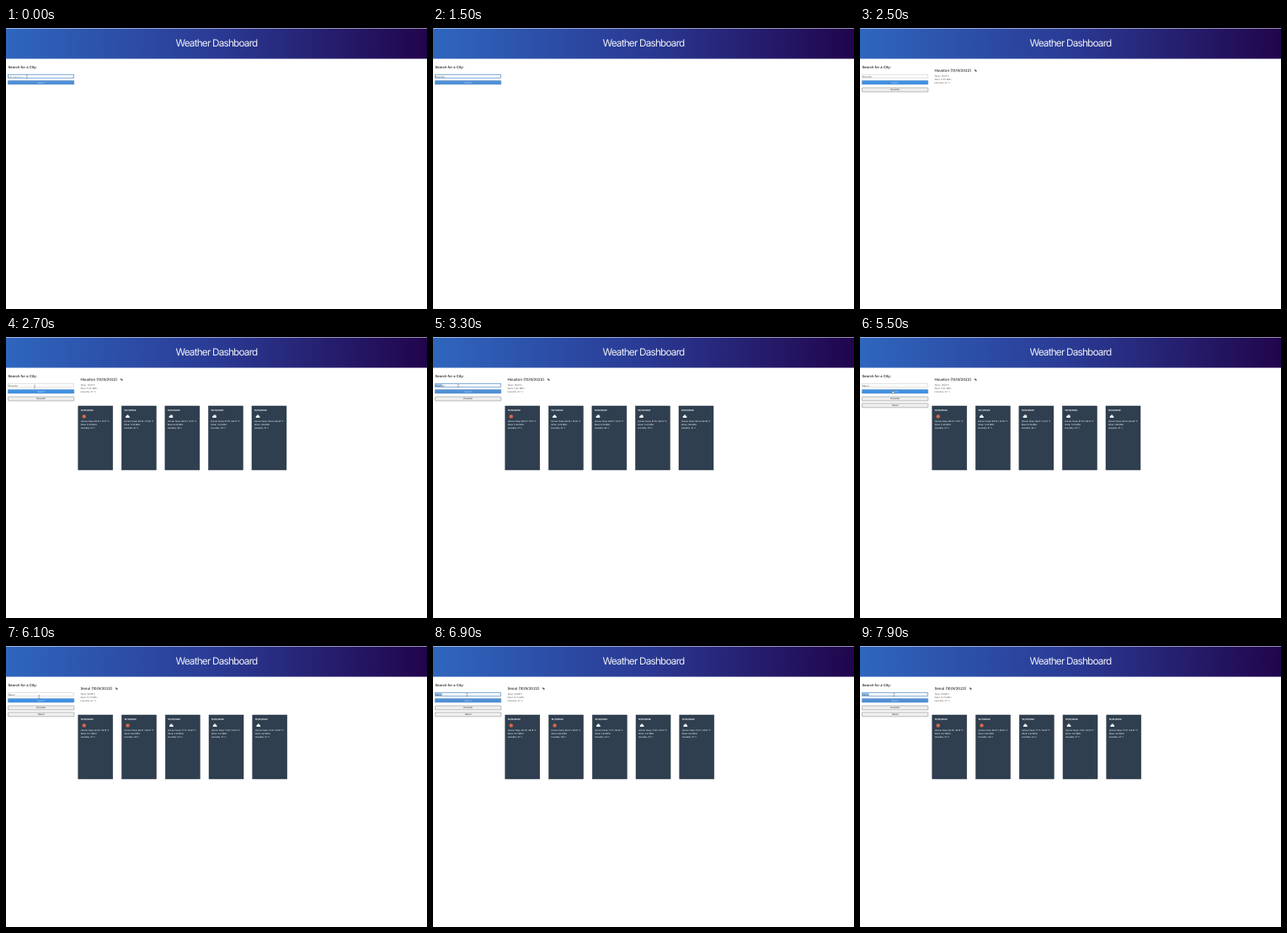
Animation, 500 px wide and 334 px high, one loop 8 s. Source, as an HTML page:

```html
<!DOCTYPE html>
<html lang="en">
<head>
<meta charset="utf-8">
<title>Weather Dashboard</title>
<style>
  html, body { margin: 0; width: 100%; height: 100%; overflow: hidden; background: #fff; }
  svg { display: block; width: 500px; height: 334px; }
  text { font-family: Inter, Roboto, "Liberation Sans", sans-serif; text-rendering: geometricPrecision; white-space: pre; }
  .title { font-size: 11.8px; font-weight: 400; letter-spacing: -.82px; fill: #eceef6; }
  .label { font-size: 4.15px; font-weight: 600; fill: #2a2a2a; }
  .field { font-size: 2.75px; fill: #444; }
  .hint { font-size: 2.6px; fill: #858b94; }
  .btn { font-size: 2.7px; fill: #c5d9f0; }
  .past { font-size: 2.75px; fill: #222; }
  .city { font-size: 4.4px; font-weight: 500; fill: #222; }
  .now { font-size: 2.55px; fill: #555; }
  .date { font-size: 2.7px; font-weight: 700; fill: #fff; }
  .info { font-size: 2.4px; font-weight: 500; fill: #f2f5f7; }
</style>
</head>
<body>
<svg id="stage" viewBox="0 0 500 334" xmlns="http://www.w3.org/2000/svg">
  <defs>
    <linearGradient id="sky">
      <stop offset="0" stop-color="#2f66be"/>
      <stop offset=".5" stop-color="#2a3a94"/>
      <stop offset="1" stop-color="#21054c"/>
    </linearGradient>
  </defs>
  <rect width="500" height="334" fill="#fff"/>
  <rect y=".55" width="500" height="36" fill="url(#sky)"/>
  <text class="title" x="250" y="22" text-anchor="middle">Weather Dashboard</text>
  <text class="label" x="2.4" y="48.3">Search for a City:</text>
</svg>
<script>
const LOOP = 8000;
const stage = document.getElementById('stage');

function add(parent, tag, attrs, text) {
  const el = document.createElementNS('http://www.w3.org/2000/svg', tag);
  for (const k in attrs) el.setAttribute(k, attrs[k]);
  if (text) el.textContent = text;
  parent.appendChild(el);
  return el;
}
const group = (parent, x = 0, y = 0) => add(parent, 'g', { transform: `translate(${x} ${y})` });
const label = (parent, cls, x, y, text, anchor = 'start') =>
  add(parent, 'text', { class: cls, x, y, 'text-anchor': anchor }, text);
const show = (el, on) => { el.style.display = on ? '' : 'none'; };

// Search form
const box = add(stage, 'rect', { x: 2.5, y: 55.5, width: 78, height: 4, fill: '#fff' });
const mark = add(stage, 'rect', { x: 3, y: 56, width: 7.6, height: 3, fill: '#9cc3f3' });
const typed = label(stage, 'field', 3, 58.5);
const button = add(stage, 'rect', { x: 2.4, y: 62.4, width: 78.4, height: 4.7, rx: .5, stroke: '#5a83b5', 'stroke-width': .4 });
label(stage, 'btn', 41.7, 65.8, 'Search', 'middle');

function pastButton(y, name) {
  const g = group(stage, 0, y);
  add(g, 'rect', { x: 2.6, y: .4, width: 78.2, height: 4.9, rx: .5, fill: '#efefef', stroke: '#858585', 'stroke-width': .55 });
  label(g, 'past', 41.7, 3.9, name, 'middle');
  return g;
}
const past = [pastButton(70.6, 'Houston'), pastButton(78.5, 'Seoul')];

// Weather icons
const blob = (g, cx, cy, r, fill) => add(g, 'circle', { cx, cy, r, fill });
function cloud(g, fill) {
  blob(g, -1.2, .4, 1.1, fill);
  blob(g, .1, -.4, 1.4, fill);
  blob(g, 1.4, .5, 1, fill);
  add(g, 'rect', { x: -2.3, y: .2, width: 4.7, height: 1.3, rx: .6, fill });
}
const icons = {
  sun: g => blob(g, 0, 0, 2.2, '#dc6743'),
  cloud: g => cloud(g, '#f4f4f4'),
  mixed(g) {
    blob(g, 1.3, -.9, 1.1, '#d4a58d');
    cloud(g, '#eee');
  }
};

function lines(g, cls, x, y, step, list) {
  list.forEach((s, i) => label(g, cls, x, y + i * step, s));
}

function summary(name, iconX, list) {
  const g = group(stage);
  label(g, 'city', 88.4, 52.3, name + ' (10/9/2022)');
  const icon = group(g, iconX, 50.4);
  blob(icon, -.7, -.3, .8, '#666');
  blob(icon, .5, .5, .9, '#444');
  lines(g, 'now', 88.4, 57.9, 4, list);
  return g;
}

function forecast(pitch, days) {
  const g = group(stage);
  days.forEach(([icon, temp, wind, damp], i) => {
    const card = group(g, 85.8 + i * pitch, 82);
    add(card, 'rect', { width: 41, height: 76, fill: '#2f3f50', stroke: '#263442', 'stroke-width': .5 });
    label(card, 'date', 2.9, 5.5, `10/${10 + i}/2022`);
    icons[icon](group(card, 7, 12.4));
    lines(card, 'info', 2.9, 19, 4, [`Hi/Low Temp: ${temp} °F`, `Wind: ${wind} MPH`, `Humidity: ${damp} %`]);
  });
  return g;
}

const cities = [
  {
    head: summary('Houston', 137.2, ['Temp: 78.67°F', 'Wind: 11.50 MPH', 'Humidity: 47 %']),
    cards: forecast(51.55, [
      ['sun', '88.07 / 70.17', '11.50', 41],
      ['cloud', '88.43 / 70.90', '11.23', 41],
      ['mixed', '86.07 / 74.07', '8.25', 56],
      ['mixed', '87.79 / 68.27', '11.41', 52],
      ['cloud', '84.61 / 66.58', '7.85', 41]
    ])
  },
  {
    head: summary('Seoul', 131.2, ['Temp: 53.89°F', 'Wind: 10.71 MPH', 'Humidity: 47 %']),
    cards: forecast(51.75, [
      ['sun', '65.19 / 49.19', '10.71', 47],
      ['sun', '68.07 / 49.67', '3.83', 48],
      ['cloud', '71.71 / 50.67', '3.42', 44],
      ['cloud', '70.61 / 50.07', '4.27', 47],
      ['cloud', '70.21 / 52.97', '4.61', 47]
    ])
  }
];

// Pointers
const beam = group(stage);
add(beam, 'path', { d: 'M-.7-1.9Q0-1.9 0-1.4V1.4Q0 1.9-.7 1.9M.7-1.9Q0-1.9 0-1.4M0 1.4Q0 1.9 .7 1.9', fill: 'none', stroke: '#555', 'stroke-width': .45 });
const hand = group(stage);
add(hand, 'path', { d: 'M-.5-2H.3V0L1.6.4V2.2H-.8L-1.6.6L-.5.8Z', fill: '#fff', stroke: '#333', 'stroke-width': .35 });

// Each step changes only the listed properties.
const steps = [
  [0, { text: '', hint: true, focus: true, sel: false, hover: false, past: 0, head: -1, cards: -1, beam: [24.8, 57.9], hand: null }],
  [300, { beam: null }],
  [500, { hint: false, text: 'H' }],
  [700, { text: 'Ho' }],
  [1100, { text: 'Hou' }],
  [1300, { text: 'Houst' }],
  [1500, { text: 'Houston' }],
  [1900, { hand: [36, 65], hover: true }],
  [2300, { focus: false, past: 1 }],
  [2500, { head: 0, hand: null }],
  [2700, { cards: 0, beam: [34, 59] }],
  [3100, { beam: [30, 58], focus: true, hover: false, sel: true }],
  [3500, { beam: null, sel: false, text: 'S' }],
  [3700, { text: 'Se' }],
  [3900, { text: 'Seo' }],
  [4100, { text: 'Seou' }],
  [4300, { text: 'Seoul' }],
  [5100, { hand: [39, 65], hover: true }],
  [5500, { focus: false, past: 2 }],
  [5700, { head: 1 }],
  [5900, { cards: 1, hand: [39, 63] }],
  [6100, { hand: null, beam: [39.2, 60.4] }],
  [6700, { beam: [40.3, 58], hover: false }],
  [6900, { focus: true, sel: true }]
];

function place(el, at) {
  show(el, at);
  if (at) el.setAttribute('transform', `translate(${at[0]} ${at[1]})`);
}

function draw(t) {
  const s = {};
  for (const [at, change] of steps) if (at <= t) Object.assign(s, change);
  typed.textContent = s.hint ? 'San Francisco' : s.text;
  typed.setAttribute('class', s.hint ? 'hint' : 'field');
  box.setAttribute('stroke', s.focus ? '#79a6d2' : '#d0d0d0');
  box.setAttribute('stroke-width', s.focus ? .9 : .6);
  button.setAttribute('fill', s.hover ? '#3f91e3' : '#4f8fd6');
  show(mark, s.sel);
  past.forEach((el, i) => show(el, i < s.past));
  cities.forEach((c, i) => {
    show(c.head, i === s.head);
    show(c.cards, i === s.cards);
  });
  place(beam, s.beam);
  place(hand, s.hand);
}

const start = performance.now();
function tick() {
  draw((performance.now() - start) % LOOP);
  requestAnimationFrame(tick);
}
tick();
</script>
</body>
</html>
```
